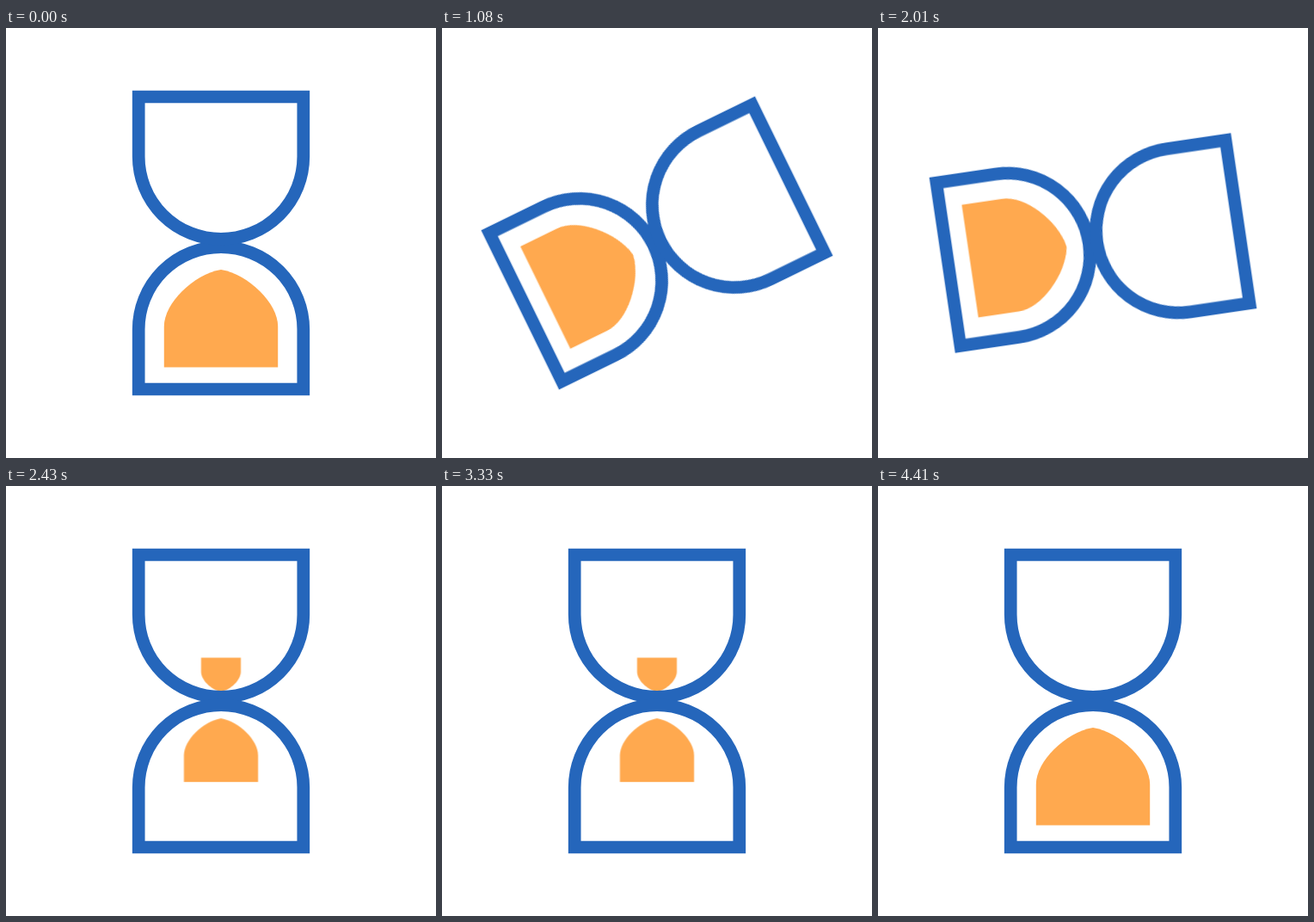
An HTML page that plays this animation: 500x500 px, repeating every 4.5 s.

```html
<!DOCTYPE html>
<html lang="en">
<head>
<meta charset="utf-8">
<title>Hourglass</title>
<style>
  html, body { margin: 0; width: 100%; height: 100%; overflow: hidden; background: #fff; }
  svg { display: block; width: 100vw; height: 100vh; }

  .glass { fill: none; stroke: #2566bb; stroke-width: 14.7; }
  .sand { fill: #ffa94f; }

  .turn, .drain, .fill {
    transform-origin: 0 0;
    animation: 900ms cubic-bezier(.3333, 0, .6667, 1) infinite;
  }
  .turn { animation-name: turn; }
  .drain { animation-name: drain; }
  .fill { animation-name: fill; }

  @keyframes turn {
    0% { transform: rotate(0deg); }
    50%, 100% { transform: rotate(180deg); }
  }
  /* The sand starts to run just before the turn is complete. */
  @keyframes drain {
    0%, 40% { transform: scale(1); }
    90%, 100% { transform: scale(0); }
  }
  @keyframes fill {
    0%, 40% { transform: scale(0); }
    90%, 100% { transform: scale(1); }
  }
</style>
</head>
<body>
<svg viewBox="-250 -250 500 500">
  <defs>
    <path id="bulb" d="M-95.8 170H95.8V100.4A95.8 95.8 0 0 0 -95.8 100.4Z"/>
    <path id="heap" d="M-66.2 144.5V97C-66.2 70 -32 36.5 0 31C32 36.5 66.2 70 66.2 97V144.5Z"/>
  </defs>
  <g class="turn">
    <g class="sand">
      <g class="drain"><use href="#heap"/></g>
      <g transform="rotate(180)"><g class="fill"><use href="#heap"/></g></g>
    </g>
    <g class="glass">
      <use href="#bulb"/>
      <use href="#bulb" transform="rotate(180)"/>
    </g>
  </g>
</svg>
</body>
</html>
```
